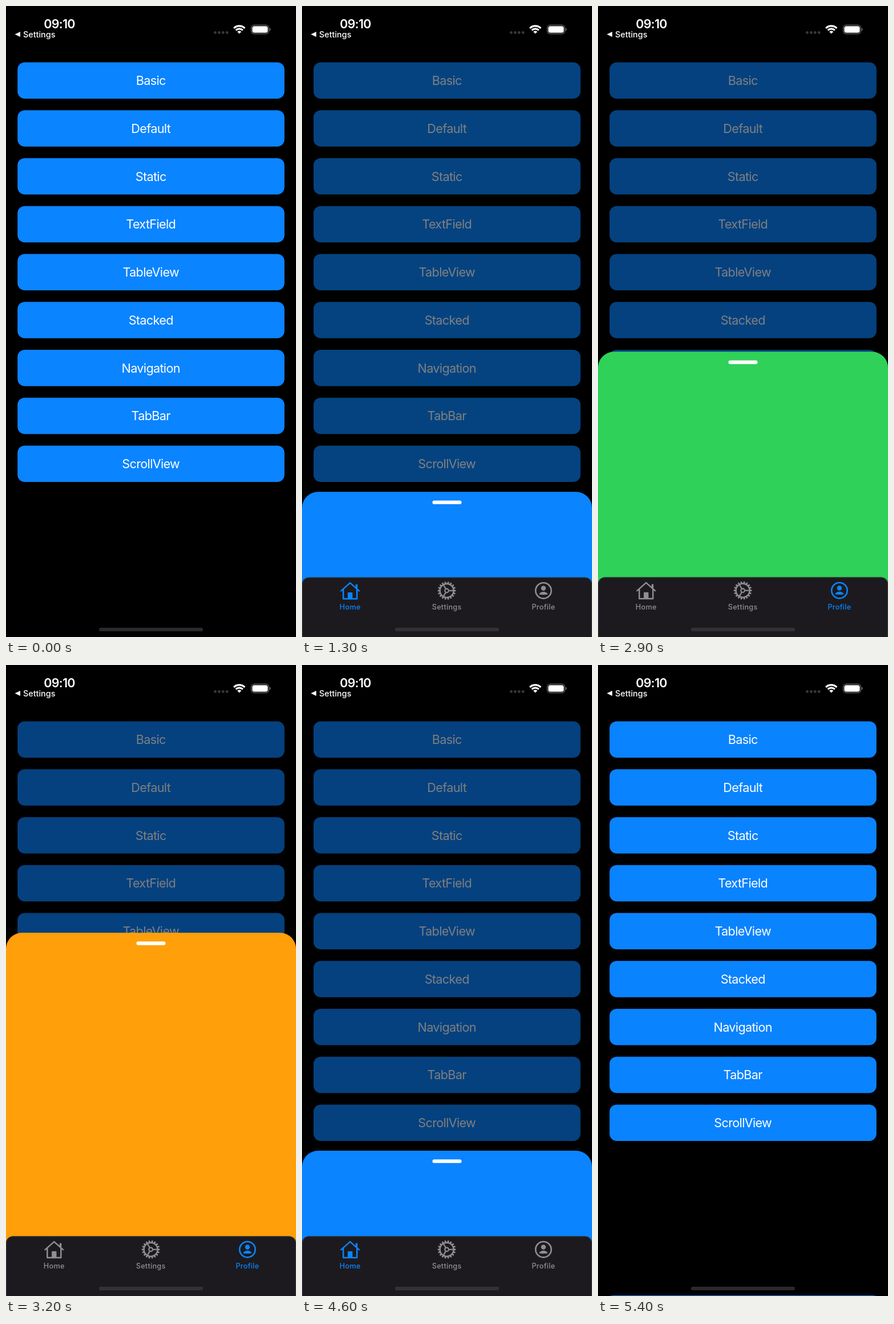
These frames come from a looping animation (508 px wide and 1103 px high, 5500 ms). An HTML page with a canvas:

```html
<!DOCTYPE html>
<html lang="en">
<head>
<meta charset="utf-8">
<title>Tab bar sheet</title>
<style>
  html, body { margin: 0; width: 100%; height: 100%; overflow: hidden; background: #000; }
  canvas { display: block; width: 508px; height: 1103px; }
</style>
</head>
<body>
<canvas id="stage" width="508" height="1103"></canvas>
<script>
const W = 508, H = 1103, LOOP = 5500, STEP = 100, PT = 1.27;
const FONT = 'Inter, Roboto, sans-serif';
const BLUE = [10, 132, 255], GREEN = [48, 209, 88], ORANGE = [255, 159, 10];
const ACTIVE = '#0a84ff', IDLE = '#8e8e93';
const BUTTONS = ['Basic', 'Default', 'Static', 'TextField', 'TableView',
  'Stacked', 'Navigation', 'TabBar', 'ScrollView'];
const HOME_H = 200 * PT;

const SHOW = 841, HIDE = 5020;
// tap: tab highlight, start: sheet resize, by: height change in points
const MOVES = [
  { tap: 1900, start: 1900, tab: 1, by: 100, color: GREEN },
  { tap: 2800, start: 2854, tab: 2, by: 200, color: ORANGE },
  { tap: 3800, start: 3869, tab: 0, by: -300, color: BLUE }
];

const ctx = document.getElementById('stage').getContext('2d');

const clamp = x => Math.min(1, Math.max(0, x));
const smooth = x => { x = clamp(x); return x * x * (3 - 2 * x); };
function spring(ms, rate) {
  if (ms <= 0) return 0;
  const x = rate * ms / 1000;
  return 1 - (1 + x) * Math.exp(-x);
}
const mix = (a, b, p) => a.map((v, i) => v + (b[i] - v) * p);
const rgb = c => `rgb(${c.map(Math.round).join(',')})`;

function box(x, y, w, h, r, fill) {
  ctx.beginPath();
  ctx.roundRect(x, y, w, h, r);
  ctx.fillStyle = fill;
  ctx.fill();
}

function dot(x, y, r, fill) {
  ctx.beginPath();
  ctx.arc(x, y, r, 0, 7);
  ctx.fillStyle = fill;
  ctx.fill();
}

function line(points, width, color, cap = 'round') {
  ctx.beginPath();
  points.forEach(([x, y]) => ctx.lineTo(x, y));
  ctx.lineWidth = width;
  ctx.strokeStyle = color;
  ctx.lineCap = cap;
  ctx.lineJoin = 'round';
  ctx.stroke();
}

function ring(x, y, r, width, color, a = 0, b = Math.PI * 2) {
  ctx.beginPath();
  ctx.arc(x, y, r, a, b);
  ctx.lineWidth = width;
  ctx.strokeStyle = color;
  ctx.lineCap = 'butt';
  ctx.stroke();
}

function text(str, x, y, size, weight, color, spacing = 0, align = 'center') {
  ctx.font = `${weight} ${size}px ${FONT}`;
  ctx.letterSpacing = spacing + 'px';
  ctx.textAlign = align;
  ctx.fillStyle = color;
  ctx.fillText(str, x, y);
}

function statusBar() {
  text('09:10', 93.5, 39.3, 21.5, 600, '#fff', -0.7);
  ctx.beginPath();
  ctx.moveTo(15.5, 49.5);
  ctx.lineTo(25, 45);
  ctx.lineTo(25, 54);
  ctx.fillStyle = '#fff';
  ctx.fill();
  text('Settings', 30, 55, 14.4, 500, '#fff', 0, 'left');

  for (let i = 0; i < 4; i++) dot(366.5 + i * 6.9, 46.5, 2.4, '#38383a');

  const a = -Math.PI * 0.75, b = -Math.PI * 0.25;
  ring(408.7, 48.5, 13.6, 3.2, '#fff', a, b);
  ring(408.7, 48.5, 8.6, 3.1, '#fff', a, b);
  ring(408.7, 48.5, 2.5, 5, '#fff', a, b);

  ctx.beginPath();
  ctx.roundRect(429.6, 33.4, 30.8, 15.2, 5);
  ctx.lineWidth = 1.2;
  ctx.strokeStyle = '#6c6c6c';
  ctx.stroke();
  box(431.4, 35.2, 27.2, 11.6, 3.6, '#fff');
  box(461.8, 38.5, 1.7, 5, [0, 2, 2, 0], '#6c6c6c');
}

function buttons() {
  BUTTONS.forEach((label, i) => {
    const y = 98.4 + i * 83.75;
    box(20.2, y, 467.6, 63.5, 12.7, rgb(BLUE));
    text(label, 253.7, y + 39.7, 21.6, 400, '#fff', -0.65);
  });
}

function houseIcon(x, y, c) {
  line([[x - 15.8, y + 0.4], [x, y - 13.6], [x + 15.8, y + 0.4]], 2.5, c);
  line([[x - 12, y - 2], [x - 12, y + 14.2], [x + 12, y + 14.2], [x + 12, y - 2]], 2.5, c);
  line([[x + 11.3, y - 11], [x + 11.3, y - 4]], 3.4, c, 'butt');
  box(x - 4.2, y + 3, 8.4, 11.5, 1, c);
}

function gearIcon(x, y, c) {
  const at = (a, r) => [x + r * Math.cos(a), y + r * Math.sin(a)];
  for (let i = 0; i < 18; i++) {
    const a = i * Math.PI / 9;
    line([at(a, 12.5), at(a, 15.8)], 2.7, c, 'butt');
  }
  ring(x, y, 12, 2.5, c);
  ring(x, y, 3.3, 2.1, c);
  for (let i = 0; i < 3; i++) {
    const a = i * Math.PI * 2 / 3;
    line([at(a, 4), at(a, 12)], 2.2, c, 'butt');
  }
}

function personIcon(x, y, c) {
  ring(x, y, 13.7, 2.6, c);
  dot(x, y - 4.2, 4.2, c);
  ctx.beginPath();
  ctx.moveTo(x - 7.6, y + 6.6);
  ctx.bezierCurveTo(x - 6, y + 0.6, x + 6, y + 0.6, x + 7.6, y + 6.6);
  ctx.quadraticCurveTo(x, y + 8.2, x - 7.6, y + 6.6);
  ctx.fillStyle = c;
  ctx.fill();
}

const TABS = [['Home', houseIcon], ['Settings', gearIcon], ['Profile', personIcon]];

function tabBar(y, selected) {
  box(0, y, W, H, 12, '#1c1a1e');
  ctx.beginPath();
  ctx.roundRect(0.6, y + 0.6, W - 1.2, H, 11.5);
  ctx.lineWidth = 1.2;
  ctx.strokeStyle = '#38373b';
  ctx.stroke();
  TABS.forEach(([label, icon], i) => {
    const x = W * (2 * i + 1) / 6 - 0.4;
    const c = i === selected ? ACTIVE : IDLE;
    icon(x, y + 23.3, c);
    text(label, x, y + 56.6, 12.7, 500, c, 0.25);
  });
}

function draw(now) {
  const t = Math.floor(now % LOOP / STEP) * STEP;
  const shown = spring(t - SHOW, 20) - spring(t - HIDE, 20);

  let height = HOME_H, color = BLUE, selected = 0;
  for (const m of MOVES) {
    if (t >= m.tap) selected = m.tab;
    height += m.by * PT * spring(t - m.start, 34);
    color = mix(color, m.color, smooth((t - m.start - 50) / 244));
  }

  ctx.fillStyle = '#000';
  ctx.fillRect(0, 0, W, H);
  buttons();
  ctx.fillStyle = `rgba(0,0,0,${shown / 2})`;
  ctx.fillRect(0, 0, W, H);
  statusBar();

  if (shown > 0) {
    const drop = (1 - shown) * HOME_H;
    const top = H - height + drop;
    box(0, top, W, H, 28, rgb(color));
    box(228.5, top + 15.2, 51, 6.4, 3.2, '#fff');
    tabBar(998.4 + drop, selected);
  }
  box(163, 1086.7, 182, 6.4, 3.2, 'rgba(60,60,63,.7)');
}

function frame() {
  draw(performance.now());
  requestAnimationFrame(frame);
}
frame();
</script>
</body>
</html>
```
